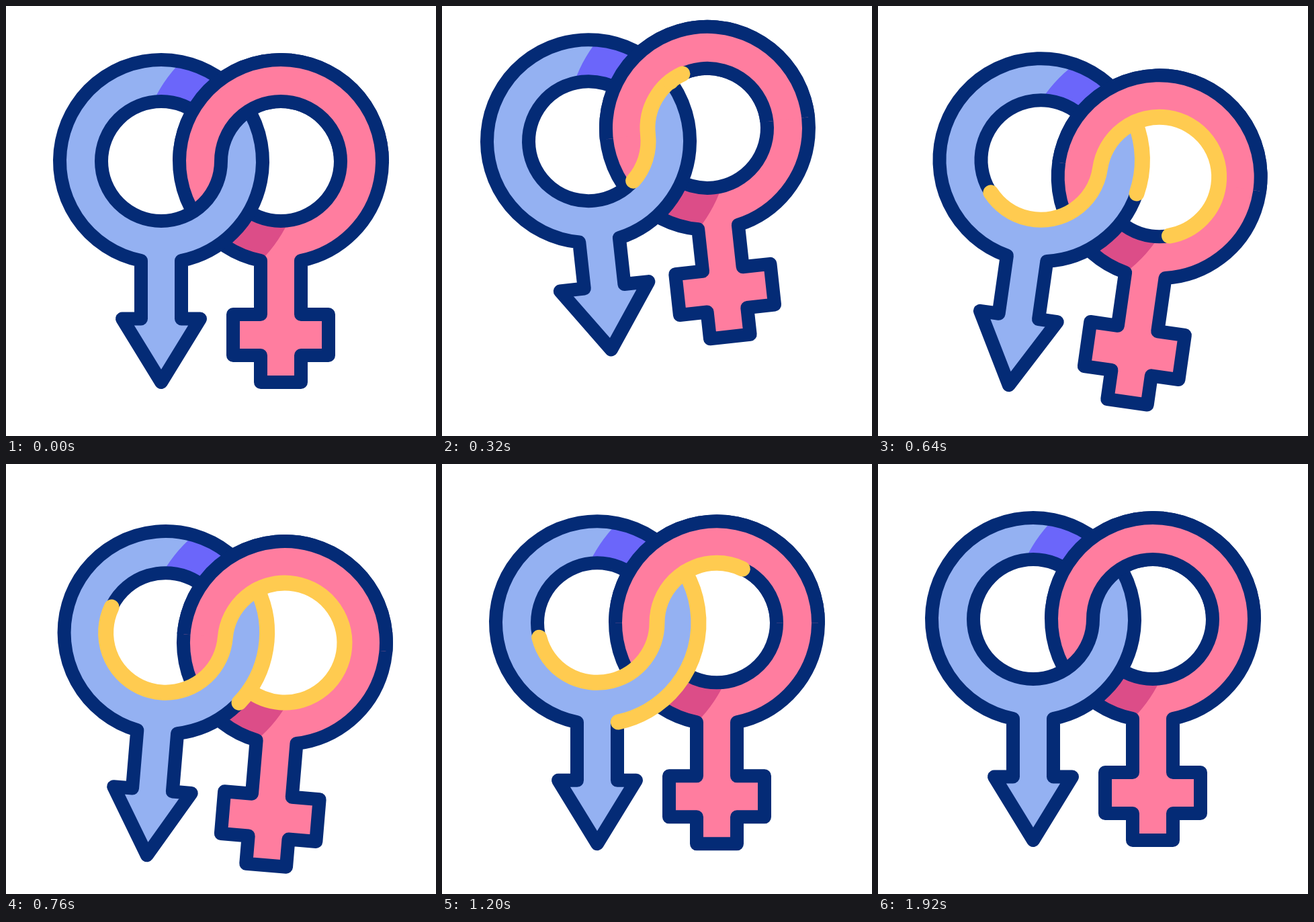
An HTML page with a canvas for the animation above (2000 ms loop, 640 by 640 pixels).

```html
<!DOCTYPE html>
<html>
<head>
<meta charset="utf-8">
<style>
html, body { margin: 0; width: 100%; height: 100%; overflow: hidden; background: #fff; }
canvas { display: block; }
</style>
</head>
<body>
<canvas id="stage" width="640" height="640"></canvas>
<script>
const ctx = document.getElementById('stage').getContext('2d');
const NAVY = '#042b76', BLUE = '#94b1f2', PURPLE = '#6b66fa';
const PINK = '#ff7d9f', ROSE = '#dc4d88', YELLOW = '#ffcb50';
const LOOP = 2000, STEP = 40, TAU = Math.PI * 2;
const LEFT = 231, RIGHT = 409, MID = 320, CY = 231, OUTER = 151, INNER = 89;
const SEED = -47, SPAN = 302;

const rad = deg => deg * Math.PI / 180;
const mix = (a, b, k) => a + (b - a) * k;
const part = (t, from, to) => Math.min(1, Math.max(0, (t - from) / (to - from)));
const easeOut = (k, p) => 1 - (1 - k) ** p;

// Smooth interpolation through [time, value] keys
function keyed(t, ...keys) {
  if (t <= keys[0][0]) return keys[0][1];
  for (let i = 1; i < keys.length; i++) {
    const [t0, v0] = keys[i - 1], [t1, v1] = keys[i];
    if (t < t1) {
      const k = part(t, t0, t1);
      return mix(v0, v1, k * k * (3 - 2 * k));
    }
  }
  return keys[keys.length - 1][1];
}

// Ring with a stem; tail lists the right half of the foot, from the stem down
function symbol(cx, tail) {
  const path = new Path2D();
  const open = Math.asin(30 / OUTER);
  path.arc(cx, CY, OUTER, Math.PI / 2 + open, Math.PI / 2 - open + TAU);
  for (const [x, y] of tail) path.lineTo(cx + x, y);
  for (const [x, y] of [...tail].reverse()) path.lineTo(cx - x, y);
  path.closePath();
  path.moveTo(cx + INNER, CY);
  path.arc(cx, CY, INNER, 0, TAU);
  path.closePath();
  return path;
}

function clipped(x, y, w, h, draw) {
  ctx.save();
  ctx.beginPath();
  ctx.rect(x, y, w, h);
  ctx.clip();
  draw();
  ctx.restore();
}

function paint(path, color, shade, shadeX, shadeY, farX) {
  ctx.fillStyle = color;
  ctx.fill(path, 'evenodd');
  ctx.save();
  ctx.clip(path, 'evenodd');
  clipped(shadeX, shadeY, MID, 180, () => {
    ctx.fillStyle = shade;
    ctx.beginPath();
    ctx.arc(farX, CY, 209.5, 0, TAU);
    ctx.fill();
  });
  ctx.restore();
  ctx.strokeStyle = NAVY;
  ctx.lineWidth = 20;
  ctx.stroke(path);
}

// S-shaped light: negative degrees run on the left ring, positive on the right
function lightCurve(from, to) {
  if (to - from < 0.2) return;
  ctx.beginPath();
  if (from < 0) ctx.arc(LEFT, CY, INNER, rad(Math.min(290, -from)), rad(Math.max(0, -to)), true);
  if (to > 0) ctx.arc(RIGHT, CY, INNER, Math.PI + rad(Math.max(0, from)), Math.PI + rad(to));
  ctx.stroke();
}

function lightEdge(amount) {
  if (amount < 0.002) return;
  ctx.beginPath();
  ctx.arc(LEFT, CY, OUTER, rad(-30), rad(-30 + 108 * amount));
  ctx.stroke();
}

function draw(t) {
  const angle = keyed(t, [100, 0], [290, -7], [520, 9.6], [1000, 0]);
  const dx = keyed(t, [100, 0], [300, -5.5], [520, 0]);
  const dy = keyed(t, [100, 0], [310, -40], [820, 30], [1340, 0]);
  const lift = keyed(t, [100, 0], [300, -17.5], [520, 0]);
  const wide = keyed(t, [100, 1], [300, 1.145], [520, 1]);
  const tall = keyed(t, [300, 1], [600, 1.1], [860, 1]);
  const foot = y => 459 + lift + (y - 459) * tall;

  const male = symbol(LEFT, [[30, foot(465.5)], [58 * wide, foot(465.5)], [0, foot(560)]]);
  const female = symbol(RIGHT, [
    [30, foot(459)], [71, foot(459)], [71, foot(520)], [30, foot(520)], [30, foot(560)]
  ]);
  const paintFemale = () => paint(female, PINK, ROSE, MID, CY, LEFT);

  ctx.fillStyle = '#fff';
  ctx.fillRect(0, 0, 640, 640);
  ctx.save();
  ctx.translate(MID + dx, 306 + dy);
  ctx.rotate(rad(angle));
  ctx.translate(-MID, -306);
  ctx.lineJoin = ctx.lineCap = 'round';

  // The right ring passes below the left one at the bottom, above it at the top
  paintFemale();
  paint(male, BLUE, PURPLE, 0, CY - 180, RIGHT);
  clipped(200, 0, 440, CY, paintFemale);

  const back = easeOut(part(t, 960, 1840), 2.4);
  const grown = (from, to) => part(t, from, to) ** 1.7;
  ctx.strokeStyle = YELLOW;
  ctx.lineWidth = 23;
  lightCurve(
    mix(mix(SEED, -SPAN, grown(300, 920)), SEED, back),
    mix(mix(SEED, SPAN, part(t, 110, 728)), SEED, back)
  );
  lightEdge(grown(300, 900) * (1 - easeOut(part(t, 1200, 1900), 1.5)));
  ctx.restore();
}

const start = performance.now();
function tick() {
  const t = (performance.now() - start) % LOOP;
  draw(Math.floor(t / STEP) * STEP);
  requestAnimationFrame(tick);
}
tick();
</script>
</body>
</html>
```
